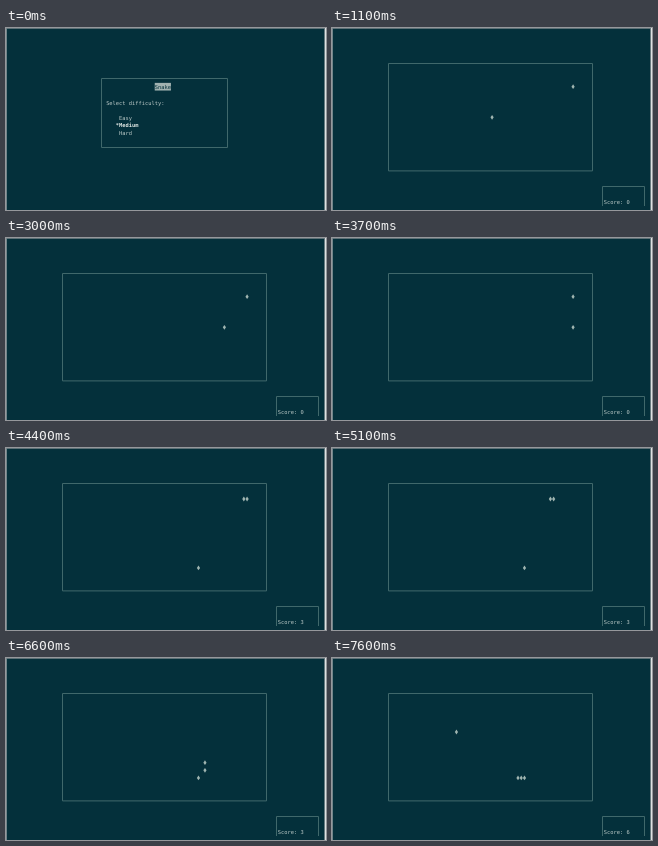
An HTML page for the animation above (7800 ms loop, 320x182 px).

```html
<!DOCTYPE html>
<html lang="en">
<head>
<meta charset="utf-8">
<title>Snake</title>
<style>
  html, body { margin: 0; width: 100%; height: 100%; overflow: hidden; background: #04303b; }
  svg { display: block; width: 320px; height: 182px; }
  text {
    font: 5.38px "DejaVu Sans Mono", "Liberation Mono", monospace;
    fill: #bccac8; white-space: pre; text-rendering: geometricPrecision;
  }
  .line { fill: none; stroke: #40686b; stroke-width: 1; }
  .bright { fill: #dfe6e3; font-weight: bold; }
  .dark { fill: #04303b; }
  .cell { fill: #a0b5b1; }
</style>
</head>
<body>
<svg id="stage" viewBox="0 0 320 182"></svg>
<script>
const LOOP = 7800, TICK = 100, HARD_AT = 800, GAME_AT = 1000;
const CW = 3.24, RH = 7.66;
const colX = c => 56.4 + c * CW;
const rowY = r => 35.7 + r * RH;
const stage = document.getElementById('stage');

function add(parent, tag, attrs = {}, content = '') {
  const el = document.createElementNS('http://www.w3.org/2000/svg', tag);
  for (const key in attrs) el.setAttribute(key, attrs[key]);
  el.textContent = content;
  parent.append(el);
  return el;
}
const write = (parent, col, row, str, cls = '') =>
  add(parent, 'text', { x: colX(col - 0.5), y: rowY(row) + 2.5, class: cls }, str);
const line = (parent, d) => add(parent, 'path', { d, class: 'line' });
const diamond = parent => add(parent, 'path', { d: 'M0-2.4L1.6 0 0 2.4-1.6 0Z', class: 'cell' });
const place = (el, [c, r]) => el.setAttribute('transform', `translate(${colX(c)} ${rowY(r)})`);
const show = (el, on) => el.setAttribute('visibility', on ? 'visible' : 'hidden');

// Terminal window edges
add(stage, 'rect', { width: 320, height: 182, fill: '#04303b' });
add(stage, 'rect', { width: 320, height: 1, fill: '#5c7076' });
add(stage, 'rect', { width: 1, height: 182, fill: '#71858a' });
add(stage, 'rect', { x: 318, width: 1, height: 182, fill: '#66797e' });
add(stage, 'rect', { x: 319, width: 1, height: 182, fill: '#dde1e1' });

// Menu
const menu = add(stage, 'g');
line(menu, 'M95.5 50.5H221.5V119.5H95.5Z');
add(menu, 'rect', { x: colX(28.5), y: rowY(3) - 3.8, width: CW * 5, height: RH, fill: '#a0b1b0' });
write(menu, 29, 3, 'Snake', 'dark');
write(menu, 14, 5, 'Select difficulty:');
const options = ['Easy', 'Medium', 'Hard'].map((name, i) => ({
  name, el: write(menu, 17, 7 + i, ' ' + name)
}));

// Game
const game = add(stage, 'g');
line(game, 'M56.5 35.5H260.5V142.9H56.5Z');
line(game, 'M270.5 178V158.5H312.5V178');
const score = write(game, 67, 18, '');
const foodEl = diamond(game);
const bodyEls = [0, 1, 2].map(() => diamond(game));

// Moves, one per tick; a dot waits
const route = 'R12 .1 R14 .1 U5 L6 .1 L7 .1 D8 .1 L5 D1 R3'
  .split(' ').map(run => run[0].repeat(+run.slice(1))).join('');
const dirs = { R: [1, 0], L: [-1, 0], U: [0, -1], D: [0, 1] };
const foods = [[57, 3], [42, 11], [21, 5]];

function playTo(ticks) {
  let body = [[31, 7]], eaten = 0;
  for (const move of route.slice(0, ticks)) {
    if (move === '.') continue;
    const [dx, dy] = dirs[move], [c, r] = body[0], [fc, fr] = foods[eaten];
    const head = [c + dx, r + dy];
    body.unshift(head);
    if (head[0] === fc && head[1] === fr) eaten++;
    else body.pop();
  }
  return { body, eaten };
}

function draw(t) {
  const playing = t >= GAME_AT;
  show(menu, !playing);
  show(game, playing);
  if (!playing) {
    const chosen = t < HARD_AT ? 1 : 2;
    options.forEach(({ name, el }, i) => {
      el.textContent = (i === chosen ? '*' : ' ') + name;
      el.setAttribute('class', i === chosen ? 'bright' : '');
    });
  }
  const { body, eaten } = playTo(Math.max(0, Math.floor((t - GAME_AT) / TICK)));
  score.textContent = 'Score: ' + eaten * 3;
  place(foodEl, foods[eaten]);
  bodyEls.forEach((el, i) => {
    show(el, playing && i < body.length);
    if (body[i]) place(el, body[i]);
  });
}

const start = performance.now();
function loop() {
  draw((performance.now() - start) % LOOP);
  requestAnimationFrame(loop);
}
loop();
</script>
</body>
</html>
```
